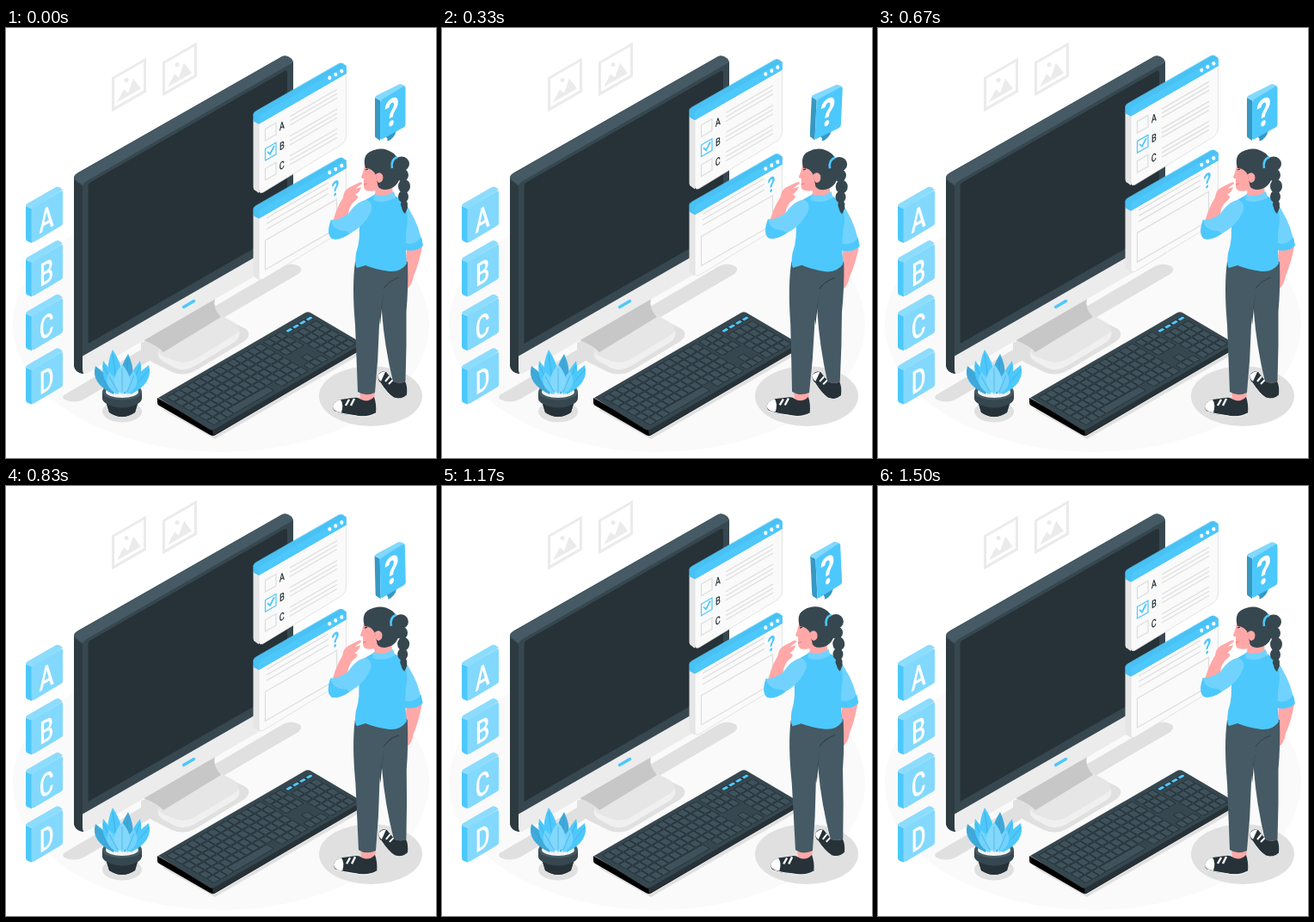
Animation, 500 px wide and 500 px high, one loop 1.54 s. Source, as an HTML page:

```html
<!DOCTYPE html>
<html lang="en">
<head>
<meta charset="utf-8">
<title>Online test</title>
<style>
  html, body { margin: 0; width: 100%; height: 100%; overflow: hidden; background: #fff; }
  svg { display: block; width: 100vw; height: 100vh; }
  text { font-family: Roboto, Arial, sans-serif; text-anchor: middle; }
  .blue { fill: #4dc8fc; } .pale { fill: #82d9fd; } .soft { fill: #71d3fd; } .deep { fill: #3798c2; }
  .ink { fill: #263238; } .slate { fill: #455a64; } .dusk { fill: #37474f; }
  .skin { fill: #ffa8a7; } .white { fill: #fff; } .shade { fill: #e0e0e0; }
  .line { fill: none; stroke: #dedede; stroke-width: 1.2; }
</style>
</head>
<body>
<svg viewBox="0 0 500 500">
  <ellipse cx="250" cy="345" rx="242" ry="148" fill="#fafafa"/>
  <g id="pictures"></g>

  <g id="monitor">
    <path class="shade" d="M67 427L322 277Q332 272 341 277Q346 281 340 286L90 432Q79 437 68 432Q65 430 67 427Z"/>
    <path class="shade" d="M157 366V374Q158 382 171 389L193 400Q207 406 221 398L276 365Q287 357 279 350L243 332Z"/>
    <path d="M177 375V381Q178 386 187 390L196 395Q207 400 218 394L266 365Q273 360 271 352Z" fill="#f0f0f0"/>
    <path d="M177 374L242 330L263 341Q276 349 266 357L218 386Q207 391 196 387L184 382Q177 379 177 374Z" fill="#e6e6e6"/>
    <path d="M160 363L243 314Q240 326 250 336L183 377Q176 369 160 363Z" fill="#c7c7c7"/>
    <path class="dusk" d="M79 174Q79 171 84 168L321 33Q326 31 331 35Q334 37 334 42V262L89 402Q80 400 79 393Z"/>
    <path class="slate" d="M80 171L322 33Q327 31 332 36L334 40L94 178Q90 181 89 184L79 177Z"/>
    <path d="M89 184Q89 181 94 178L334 40V262L89 402Z" fill="#37474f"/>
    <path class="ink" d="M79 175L89 183V402Q80 400 79 393Z" opacity=".55"/>
    <path class="ink" d="M95.500 184Q95.500 181 98 179.500L324 50Q327 49 327 52V234L95.500 367Z"/>
    <path d="M89 381.500L334 241V259Q334 263 330 265L95 401Q89 404 89 397Z" fill="#ececec"/>
    <path d="M206.500 324.500L218.500 317.500" stroke="#4dc8fc" stroke-width="3.400" stroke-linecap="round"/>
  </g>

  <g id="blocks"></g>

  <g id="plant">
    <ellipse class="shade" cx="135" cy="446" rx="23" ry="12.500"/>
    <path class="dusk" d="M112 423H158V431Q157 435 153 437L150 447Q135 457 120 447L117 437Q112 434 112 431Z"/>
    <path class="ink" d="M117 437Q135 446 153 437L150 447Q135 457 120 447Z"/>
    <ellipse class="slate" cx="135" cy="423" rx="23" ry="9.500"/>
    <ellipse cx="135" cy="423" rx="19" ry="7" fill="#f2f2f2"/>
    <g id="leaves"></g>
  </g>

  <g id="keyboard">
    <path class="shade" d="M182 444L351 345L425 372L243 478Z"/>
    <path d="M176 430L241 467L416 366V372L243 473.500Q240 475 237 473L178 439Q176 438 176 436Z"/>
    <path class="dusk" d="M177 430L348 331Q351 329.500 354 331L415 367L243 467Q240 468.500 237 467Z"/>
    <path class="ink" d="M240 468L415 367V373L241 474Z"/>
    <g id="keys" transform="matrix(1.74 -1 1.6 .925 177 430)"></g>
  </g>

  <ellipse class="shade" cx="424" cy="428" rx="60" ry="35"/>
  <g id="windows"></g>

  <g id="bubble">
    <path class="deep" d="M441 124L454 116Q454 125 447 130Q444 132 443 131Q445 129 441 126Z"/>
    <path class="deep" d="M429 81L435 84V131L430 127.500Q429 127 429 125Z"/>
    <path class="pale" d="M429 81Q429 79.500 431 78.500L457 65.500Q459 65 461 66L464 67.500L435 84.500Z"/>
    <path class="blue" d="M435 86Q435 84 437 83L462 68Q464.500 67 464.500 70V112Q464.500 114 462.500 115.500L438 129Q435 131 435 128Z"/>
    <text class="white" transform="matrix(.78 -.43 0 1 448.500 113.500)" font-size="44" font-weight="700">?</text>
  </g>

  <g id="person">
    <path class="skin" d="M466 254L484 254Q480 275 474 288Q472 300 466 303L463 301Z"/>

    <path class="skin" d="M450 405L464 408L464 418Q456 421 450 416Z"/>
    <path class="ink" d="M433 403Q436 398 442 400L451 411Q458 414 464 411Q467 416 466 427Q460 433 451 430Q443 424 435 412Q431 407 433 403Z"/>
    <path class="white" d="M433 403Q437 399 441 400L436 411Q431 407 433 403Z"/>
    <path d="M441 411L446 405M445 414L450 409" stroke="#fff" stroke-width="2"/>
    <path d="M435 412Q443 425 451 430Q460 433 466 427" fill="none" stroke="#e6e6e6" stroke-width="1"/>

    <path class="skin" d="M411 420H429L428 433Q419 439 412 432Z"/>
    <path class="ink" d="M380 440Q381 434 389 432L404 430Q409 429 413 432Q421 436 428 429Q431 437 430 448Q420 454 404 450Q392 450 383 446Q380 444 380 440Z"/>
    <path class="white" d="M380 440Q381 434 389 432Q393 438 390 447Q380 446 380 440Z"/>
    <path d="M395 439L399 432M401 439L405 431" stroke="#fff" stroke-width="2.400"/>
    <path d="M382 446Q393 449 404 450.500Q420 454 430 448" fill="none" stroke="#eee" stroke-width="1.200"/>

    <path class="slate" d="M432 272H467Q468 302 465.500 330Q466 370 464.500 411Q457 414 450 411Q440 370 437 330Z"/>
    <path class="dusk" d="M441 296Q437 320 435 346Q434 330 432 312Z"/>
    <path class="slate" d="M406 272Q402 300 406 345Q408 395 409 423Q418 429 429 424Q433 385 434 345Q437 310 444 296Q456 292 467 281L466 271Z"/>
    <path d="M439 303Q445 294 457 290" fill="none" stroke="#2f3f47"/>

    <path class="soft" d="M449 196Q464 199 470 213Q481 231 484 252Q476 260 464 258Z"/>
    <path class="blue" d="M464 250Q476 253 483 243L485 253Q477 261 464 258Z"/>
    <path class="blue" d="M430 193Q446 190 457 198Q467 205 467 225Q463 245 466 274Q459 284 446 283Q430 281 418 276L408 279Q405 276 407 262Q413 245 410 222Q408 207 416 201Z"/>
    <path class="skin" d="M379 231Q382 213 392 197Q393 188 400 185L410 180Q414 178 414 181L406 187L413 185Q412 190 406 194Q412 195 407 200Q402 203 399 211L396 227Z"/>
    <path class="soft" d="M378 223Q386 224 398 216Q409 200 420 200Q428 205 424 214Q417 230 400 239Q388 247 379 245Q372 240 378 223Z"/>
    <path class="blue" d="M378 223Q380 236 396 236L400 239Q387 248 379 245Q372 239 378 223Z"/>

    <path class="skin" d="M430 178L449 182L450 194Q441 201 429 195Z"/>
    <path class="soft" d="M428 193Q440 198 451 190L453 197Q440 205 427 200Z"/>
    <path class="skin" d="M418 157Q416 164 415 168L413 173Q413 175 416 175V180Q415 187 419 189Q427 191 435 187L446 170L438 153Z"/>
    <path d="M416 182L420 181" stroke="#e67b80"/>
    <path d="M418 165L421 164" stroke="#263238" stroke-width="1.300"/>
    <path class="dusk" d="M418 163Q414 149 423 144Q438 136 451 146Q460 154 459 170Q456 187 441 188Q432 188 432 181L430 171Q426 163 418 163Z"/>
    <path class="skin" d="M430 170Q435 166 438 171Q440 178 434 180Q430 179 430 170Z"/>
    <g class="dusk" id="braid"></g>
    <path class="dusk" d="M460 202Q467 204 467 209L464 216Q459 212 460 202Z"/>
    <path d="M455 150Q447 153 449 163" fill="none" stroke="#4dc8fc" stroke-width="2.600"/>
  </g>
</svg>

<script>
const $ = id => document.getElementById(id);
const add = (id, markup) => { $(id).innerHTML += markup; };
const iso = (x, y) => `transform="matrix(.74 -.42 0 1 ${x} ${y})"`;

// Upright parallelogram that climbs to the right at 30 degrees
const face = (x, y, w, h) => {
  const rise = w * .577;
  return `M${x} ${y}L${x + w} ${y - rise}V${y - rise + h}L${x} ${y + h}Z`;
};
const ruled = (x, y, w) => `<path class="line" d="M${x} ${y}L${x + w} ${y - w * .577}"/>`;

for (const [x, y] of [[123, 57.500], [182, 39.500]]) {
  add('pictures', `<path d="${face(x, y, 40, 40)}" fill="#ebebeb"/>
    <path class="white" d="${face(x + 3, y + 1.500, 34, 33)}"/>
    <path d="M${x + 6} ${y + 29}L${x + 14} ${y + 14}L${x + 19} ${y + 18}L${x + 25} ${y + 1}L${x + 34} ${y + 13}Z" fill="#ebebeb"/>
    <circle cx="${x + 17}" cy="${y + 3}" r="2.500" fill="#ebebeb"/>`);
}

[...'ABCD'].forEach((letter, i) => {
  add('blocks', `<g transform="translate(0 ${i * 62.600})">
    <path class="blue" d="M23 207L30 210V250L25 248Q23 247 23 245Z"/>
    <path fill="#8cdcfd" d="M23 207Q23 205 25 204L58 185Q60 184 62 185L66 188L30 210Z"/>
    <path class="pale" d="M29.500 212Q29.500 210 31 209L63 190Q66 188 66 191V227Q66 229 64 230L33 248.500Q29.500 250.500 29.500 247Z"/>
    <text class="white" transform="matrix(.7 -.4 0 1 47.200 234.500)" font-size="37" font-weight="500">${letter}</text></g>`);
});

// Leaves: base x, tip x, tip y, half width, fill
const leaves = [
  [130, 124, 374, 11, '#4dc8fc'], [138, 142, 379, 10, '#3fa9da'],
  [125, 104, 393, 11, '#3fa9da'], [145, 166, 392, 11, '#4dc8fc'],
  [128, 113, 387, 8, '#4dc8fc'], [143, 156, 387, 8, '#4dc8fc'],
  [130, 120, 400, 9, '#71d3fd'], [141, 149, 399, 9, '#71d3fd'],
  [135, 135, 391, 12, '#82d9fd']
];
for (const [x, tx, ty, w, fill] of leaves) {
  const mx = (x + tx) / 2, my = (425 + ty) / 2;
  add('leaves', `<path fill="${fill}" d="M${x} 426Q${mx - w * 1.500} ${my + 4} ${tx} ${ty}Q${mx + w * 1.500} ${my + 4} ${x} 426Z"/>
    <path d="M${x} 423L${tx} ${ty + 5}" stroke="#3798c2" stroke-width=".5"/>`);
}

const key = (x, y, w, h = 5.200, fill = '#3f525c') =>
  `<rect x="${x}" y="${y}" width="${w}" height="${h}" rx=".7" fill="${fill}" stroke="#263238" stroke-width=".5"/>`;
let keys = '';
for (let r = 0; r < 6; r++) {
  const y = 2.700 + r * 5.900;
  for (let c = 0; c < 14; c++) {
    if (r < 5 || c < 3 || c > 9) keys += key(3 + c * 4.500, y, 4.100);
  }
  if (r == 5) keys += key(16.500, y, 26.500);
  for (let c = 0; c < 3; c++) {
    if (r < 3 || r == 5 || (r == 4 && c == 1)) keys += key(67.500 + c * 4, y, 3.700);
  }
  for (let c = 0; c < 4; c++) {
    keys += r ? key(81 + c * 4.200, y, 3.900) : key(81.200 + c * 4.500, 3.600, 3.800, 2.400, '#4dc8fc');
  }
}
add('keys', keys);

const frame = (top, h) => `
  <path d="M287.500 ${top + 6}L294 ${top + 10}V${top + h}L290 ${top + h - 3}Q287.500 ${top + h - 4} 287.500 ${top + h - 7}Z" fill="#e6e6e6"/>
  <path d="M294 ${top + 8}L395.500 ${top - 50}V${top + h - 67}Q395.500 ${top + h - 61} 391 ${top + h - 57}L299 ${top + h - 1}Q294 ${top + h + 1} 294 ${top + h - 4}Z" fill="#fafafa" stroke="#dedede" stroke-width=".8"/>
  <path class="deep" d="M287.500 ${top - 1}L291 ${top - 4}L389 ${top - 60}L395.500 ${top - 57}V${top - 48}L294 ${top + 10.500}L287.500 ${top + 7}Z"/>
  <path class="blue" d="M287.500 ${top - 1}Q287.500 ${top - 3} 291 ${top - 5}L387 ${top - 60}Q390 ${top - 61} 392 ${top - 60}L395.500 ${top - 57}V${top - 48}L294 ${top + 10.500}L287.500 ${top + 7}Z" opacity=".85"/>
  <path class="blue" d="M294 ${top + 4}Q294 ${top + 1} 297 ${top - 1}L393 ${top - 56}Q395.500 ${top - 57} 395.500 ${top - 54}V${top - 48}L294 ${top + 10.500}Z"/>
  ${[0, 1, 2].map(i => `<ellipse class="white" cx="${376.300 + i * 7}" cy="${top - 43 - i * 3.900}" rx="2" ry="2.400"/>`).join('')}`;

let quiz = frame(101, 91);
[...'ABC'].forEach((letter, i) => {
  const y = i * 23;
  quiz += `<path class="line" d="${face(301.500, 117.500 + y, 12.500, 13.500)}" ${i == 1 ? 'style="stroke:#4dc8fc"' : ''}/>
    <text class="ink" ${iso(320.800, 118 + y)} font-size="12.500" font-weight="500">${letter}</text>`;
  for (let j = 0; j < 3; j++) quiz += ruled(330, 103 + y + j * 5, 55);
});
quiz += '<path d="M304 144L307 146.500L312 137" fill="none" stroke="#4dc8fc" stroke-width="1.800"/>';

const note = frame(211, 82) +
  ruled(303, 221, 72) + ruled(303, 227.500, 72) + ruled(303, 234, 72) +
  `<path class="line" d="${face(301.500, 247, 83, 34)}"/>
  <text class="blue" ${iso(383, 195)} font-size="24" font-weight="700">?</text>`;
add('windows', note + quiz);

for (const [x, y, rx, ry] of [[460, 158, 9, 8.500], [461, 171, 7, 7.500], [463, 184, 7, 8], [462, 196, 6, 7], [463, 205, 4, 5]]) {
  add('braid', `<ellipse cx="${x}" cy="${y}" rx="${rx}" ry="${ry}"/>`);
}

// Motion runs at 24 steps a second, one cycle per 36 steps
const LOOP = 1540, STEP = 1000 / 24, CYCLE = 36;
const bob = p => 1 - Math.abs(1 - 2 * p);
const sway = p => p < .25 ? p * 4 : p < .75 ? 2 - p * 4 : p * 4 - 4;
const pose = p => {
  const turn = sway(p) - sway(1 / CYCLE);
  $('windows').setAttribute('transform', `translate(0 ${-10 * (bob(p) - bob(1 / CYCLE))})`);
  $('person').setAttribute('transform', `rotate(${turn} 430 296)`);
  $('bubble').setAttribute('transform', `rotate(${3 * turn} 447 98)`);
};
const start = performance.now();
function tick() {
  const t = (performance.now() - start) % LOOP;
  const step = Math.floor((t + 4.900) / STEP);
  pose((step + 1) % CYCLE / CYCLE);
  requestAnimationFrame(tick);
}
tick();
</script>
</body>
</html>
```
